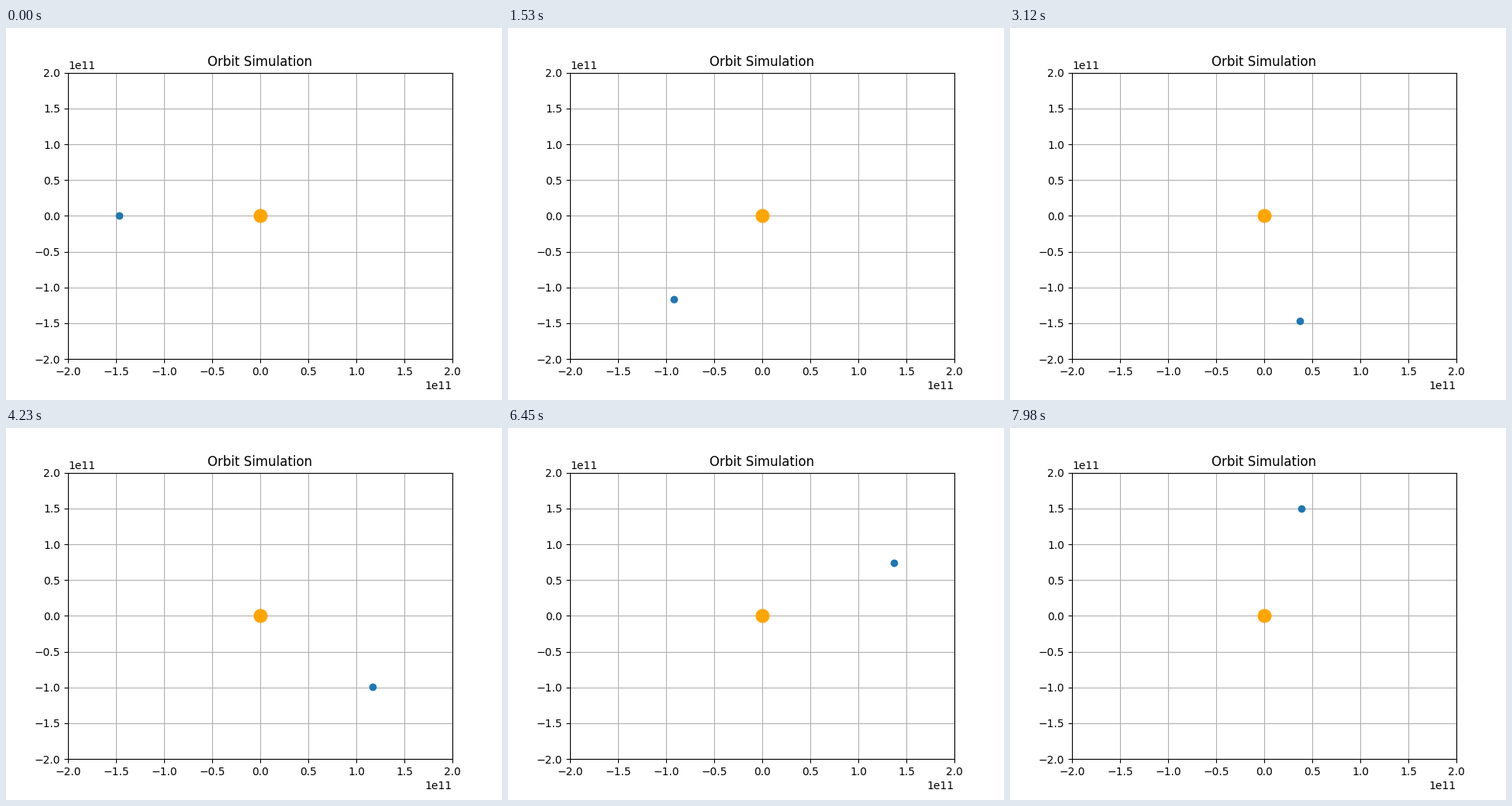
A matplotlib script for the animation above (8 s loop, 640x480 px).

```python
import numpy as np
import matplotlib.pyplot as plt
from matplotlib.animation import FuncAnimation

GM = 6.674e-11 * 1.989e30   # Sun
START = (-1.471e11, 0.0)    # perihelion, m
SPEED = 30300.0             # m/s
DAY = 86400.0
SUBSTEPS = 6                # Euler steps per day
DAYS = 267                  # one frame per day
LOOP_MS = 8000


def orbit(days):
    """Daily positions from a plain Euler integration."""
    dt = DAY / SUBSTEPS
    pos = np.array(START)
    vel = np.array([0.0, -SPEED])
    path = [pos]
    for _ in range(days - 1):
        for _ in range(SUBSTEPS):
            acc = -GM * pos / np.hypot(*pos) ** 3
            pos, vel = pos + vel * dt, vel + acc * dt
        path.append(pos)
    return np.array(path)


path = orbit(DAYS)

fig, ax = plt.subplots(figsize=(6.4, 4.8), dpi=100)
ax.set_xlim(-2e11, 2e11)
ax.set_ylim(-2e11, 2e11)
ax.set_title("Orbit Simulation")
ax.grid(True)
ax.plot([0], [0], "o", color="orange", markersize=12)
planet, = ax.plot([START[0]], [START[1]], "o", color="tab:blue", markersize=6)


def update(day):
    x, y = path[day]
    planet.set_data([x], [y])
    return planet,


anim = FuncAnimation(fig, update, frames=DAYS, interval=LOOP_MS / DAYS,
                     repeat=True, repeat_delay=0, blit=False)
plt.show()
```
